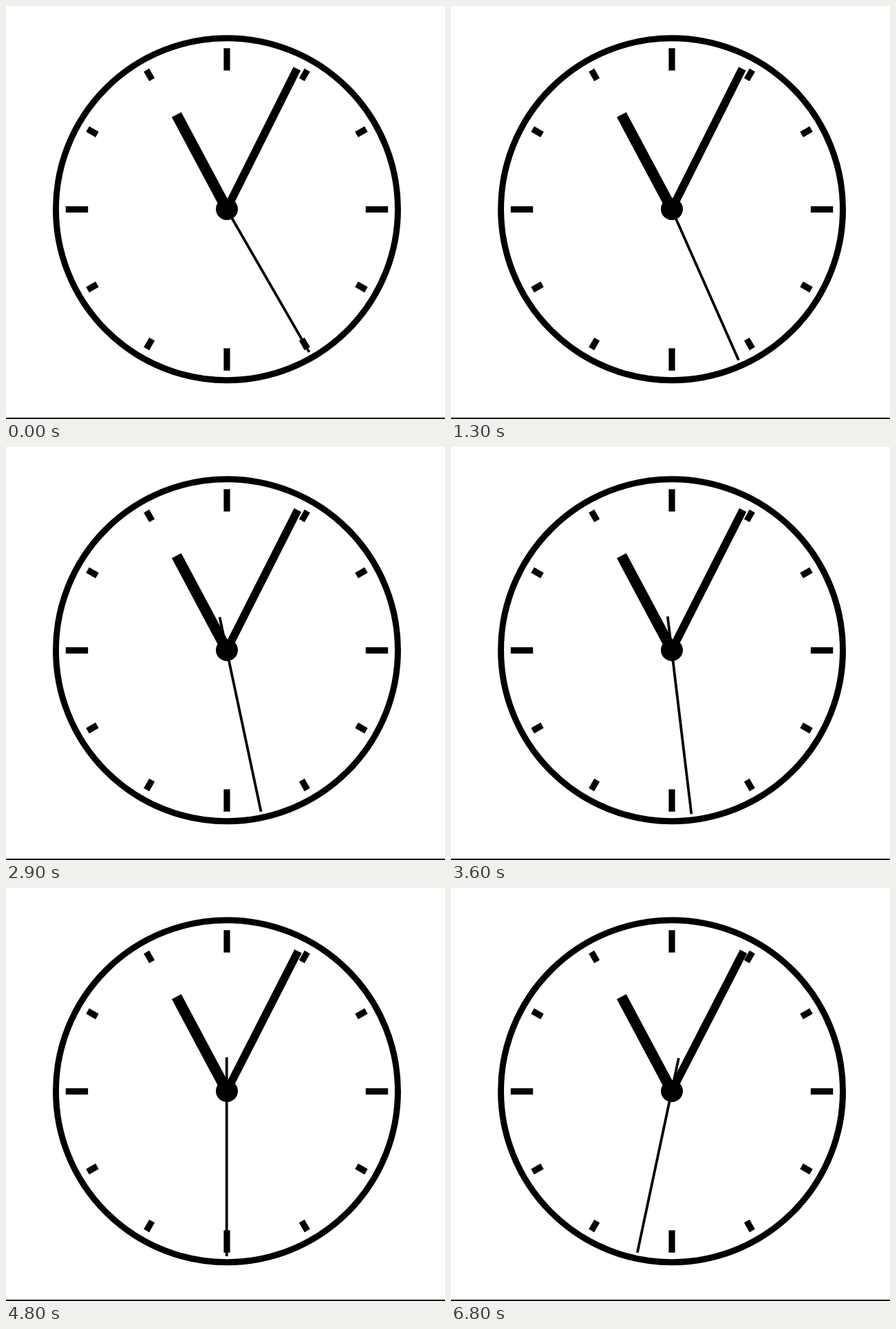
An HTML page for the animation above (7100 ms loop, 638x600 px).

```html
<!DOCTYPE html>
<html lang="en">
<head>
<meta charset="utf-8">
<title>Clock</title>
<style>
  html, body { margin: 0; width: 100%; height: 100%; overflow: hidden; background: #fff; }
  svg { display: block; width: 638px; height: 600px; }
</style>
</head>
<body>
<svg viewBox="0 0 638 600">
  <circle cx="321" cy="295.2" r="248.5" fill="none" stroke="#000" stroke-width="9"/>
  <g id="marks"></g>
  <rect x="-7.8" y="-155.4" width="15.6" height="155.4" transform="translate(321 295) rotate(-28.1)"/>
  <rect id="minute" x="-6" y="-228" width="11.7" height="228"/>
  <rect id="second" x="-1.9" y="-49" width="3.8" height="289"/>
  <circle cx="321" cy="295" r="16"/>
  <rect y="598" width="638" height="2" fill="#15151a"/>
</svg>
<script>
const LOOP = 7100, STEP = 100;
// Step at which each tick of the second hand begins
const STARTS = [1, 13, 23, 32, 42, 53, 63];

const marks = document.getElementById('marks');
const minute = document.getElementById('minute');
const second = document.getElementById('second');

// Long marks at the quarters, short ones between
for (let hour = 0; hour < 12; hour++) {
  const quarter = hour % 3 === 0;
  const length = quarter ? 32.4 : 16;
  const mark = document.createElementNS('http://www.w3.org/2000/svg', 'rect');
  const attrs = {
    x: -4.6, y: -(quarter ? 218 : 225.7) - length / 2, width: 9.2, height: length,
    transform: `translate(321 295.5) rotate(${hour * 30})`
  };
  for (const key in attrs) mark.setAttribute(key, attrs[key]);
  marks.append(mark);
}

const clamp = v => Math.min(1, Math.max(0, v));
const ease = p => p * p * p * (10 + p * (6 * p - 15));

// Seconds ticked off at time t; later ticks take slightly fewer steps
function elapsed(t) {
  const step = Math.floor(t / STEP);
  return STARTS.reduce((sum, start, i) => {
    const count = Math.round(8.2 - 0.36 * i);
    return sum + ease(clamp((step - start + 1) / count));
  }, 0);
}

function turn(hand, x, deg) {
  hand.setAttribute('transform', `translate(${x} 295) rotate(${deg})`);
}

function draw(t) {
  const s = elapsed(t);
  turn(second, 320.7, -30 + 6 * s);
  turn(minute, 321, 26.6 + 0.09 * s);
}

const origin = performance.now();
function frame() {
  draw((performance.now() - origin) % LOOP);
  requestAnimationFrame(frame);
}
draw(0);
requestAnimationFrame(frame);
</script>
</body>
</html>
```
